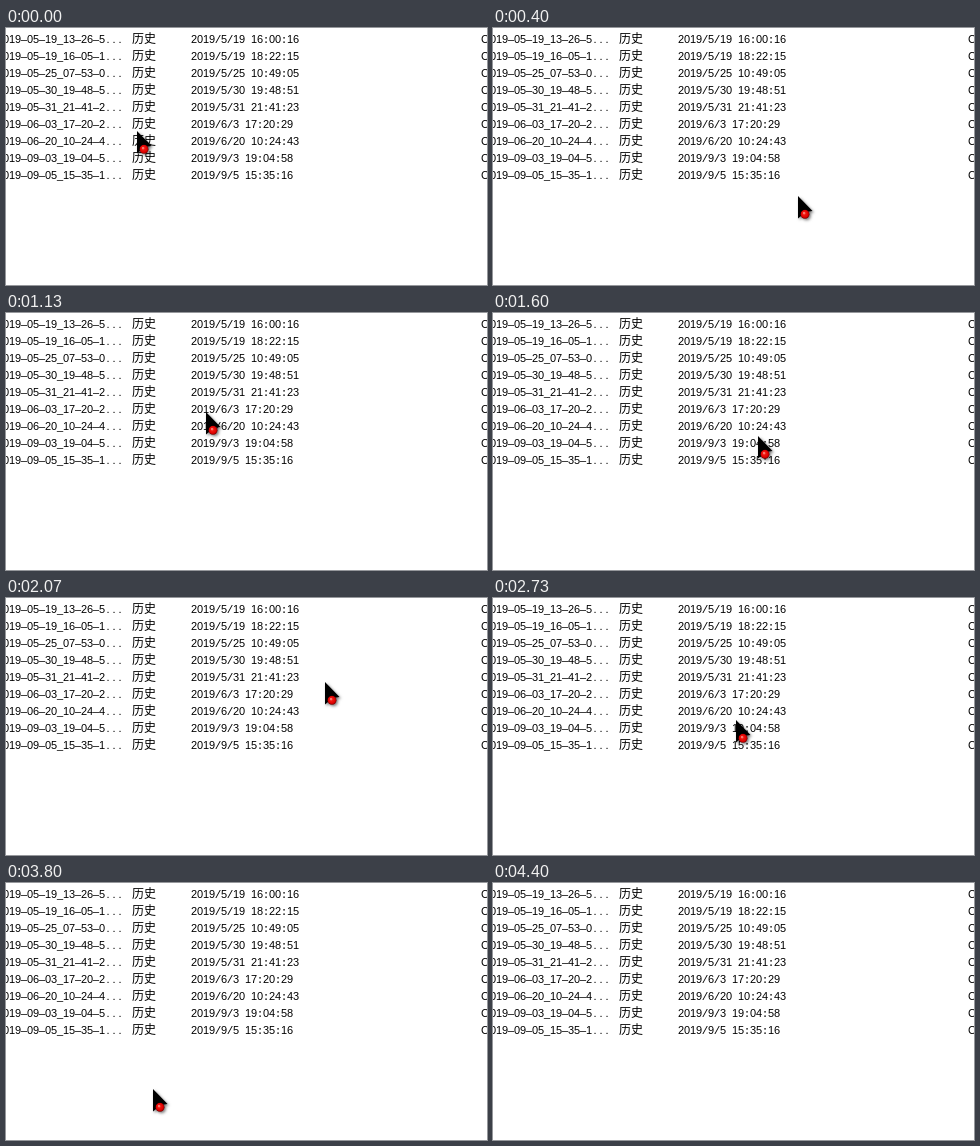
These frames come from a looping animation (481x257 px, 5.07 s). An HTML page with a canvas:

```html
<!DOCTYPE html>
<html lang="zh">
<head>
<meta charset="utf-8">
<style>
  html, body { margin: 0; width: 100%; height: 100%; overflow: hidden; background: #fff; }
  canvas { display: block; }
</style>
</head>
<body>
<canvas width="481" height="257"></canvas>
<script>
const ctx = document.querySelector('canvas').getContext('2d');
const LOOP = 5070, CELL = 6, ROW = 17;
const HOLD_AT = 57, HOLD_STEPS = 3, GONE = 66;

const rows = [
  ['019-05-19_13-26-5', '2019/5/19 16:00:16'],
  ['019-05-19_16-05-1', '2019/5/19 18:22:15'],
  ['019-05-25_07-53-0', '2019/5/25 10:49:05'],
  ['019-05-30_19-48-5', '2019/5/30 19:48:51'],
  ['019-05-31_21-41-2', '2019/5/31 21:41:23'],
  ['019-06-03_17-20-2', '2019/6/3 17:20:29'],
  ['019-06-20_10-24-4', '2019/6/20 10:24:43'],
  ['019-09-03_19-04-5', '2019/9/3 19:04:58'],
  ['019-09-05_15-35-1', '2019/9/5 15:35:16']
];

// Pointer path: step, x, y
const path = [
  [0, 131, 103], [2, 166, 93], [5, 268, 174], [8, 348, 135], [11, 206, 150],
  [13, 85, 110], [14, 93, 75], [15, 119, 63], [16, 152, 92], [18, 252, 105],
  [19, 306, 125], [20, 291, 148], [22, 216, 153], [24, 265, 123], [25, 241, 145],
  [26, 201, 147], [27, 179, 105], [28, 201, 52], [29, 251, 29], [30, 299, 45],
  [31, 319, 84], [32, 267, 125], [34, 191, 154], [36, 130, 128], [38, 161, 91],
  [41, 243, 122], [42, 289, 138], [44, 216, 160], [46, 130, 85], [47, 171, 67],
  [48, 247, 125], [50, 220, 170], [54, 138, 190], [56, 153, 201], [57, 147, 206],
  [58, 142, 212], [62, 102, 249]
];

// Smooth curve through the path points
function pointerAt(step) {
  let i = 0;
  while (i < path.length - 2 && path[i + 1][0] <= step) i++;
  const a = path[i], b = path[i + 1];
  const before = path[i - 1] || a, after = path[i + 2] || b;
  const span = b[0] - a[0], u = (step - a[0]) / span;
  return [1, 2].map(k => {
    const m = (b[k] - before[k]) / (b[0] - before[0]) * span;
    const n = (after[k] - a[k]) / (after[0] - a[0]) * span;
    const d = b[k] - a[k];
    return a[k] + u * (m + u * (3 * d - 2 * m - n + u * (m + n - 2 * d)));
  });
}

// One character per fixed cell
function cells(text, x, y) {
  ctx.textAlign = 'center';
  [...text].forEach((c, i) => {
    ctx.font = c === '/' || c === ':'
      ? '11px "Liberation Mono", monospace'
      : '11px "Liberation Sans", sans-serif';
    ctx.fillText(c === '-' ? '–' : c, x + i * CELL + CELL / 2, y);
  });
}

function drawList() {
  ctx.fillStyle = '#000';
  rows.forEach(([name, date], i) => {
    const y = 15 + i * ROW;
    cells(name + '...', -3, y);
    cells(date, 185, y);
    ctx.textAlign = 'left';
    ctx.font = '12px "Noto Sans CJK SC", "Noto Sans CJK", sans-serif';
    ctx.fillText('历史', 126, y);
    ctx.font = '11px "Liberation Sans", sans-serif';
    ctx.fillText('C', 475, y);
  });
}

function drawPointer(x, y) {
  ctx.save();
  ctx.translate(x, y);
  ctx.shadowColor = 'rgba(0,0,0,.5)';
  ctx.shadowBlur = 3;
  ctx.shadowOffsetX = ctx.shadowOffsetY = 1.5;
  ctx.fillStyle = '#000';
  ctx.fill(new Path2D('M0 0L14.5 15L8 16L0 22.5Z'));
  const ball = ctx.createRadialGradient(5.8, 16.8, 0, 7, 18.2, 4.6);
  ball.addColorStop(0, '#ffc0b8');
  ball.addColorStop(.35, '#f01810');
  ball.addColorStop(.75, '#e00000');
  ball.addColorStop(1, '#700000');
  ctx.fillStyle = ball;
  ctx.beginPath();
  ctx.arc(7, 18.2, 4.5, 0, 7);
  ctx.fill();
  ctx.restore();
}

function draw(now) {
  const step = Math.floor(now % LOOP * .015 + .06);
  ctx.fillStyle = '#fff';
  ctx.fillRect(0, 0, 481, 257);
  drawList();
  if (step < GONE) {
    const moved = step > HOLD_AT ? Math.max(HOLD_AT, step - HOLD_STEPS) : step;
    drawPointer(...pointerAt(moved).map(Math.round));
  }
}

const start = performance.now();
function tick() {
  draw(performance.now() - start);
  requestAnimationFrame(tick);
}
tick();
</script>
</body>
</html>
```
